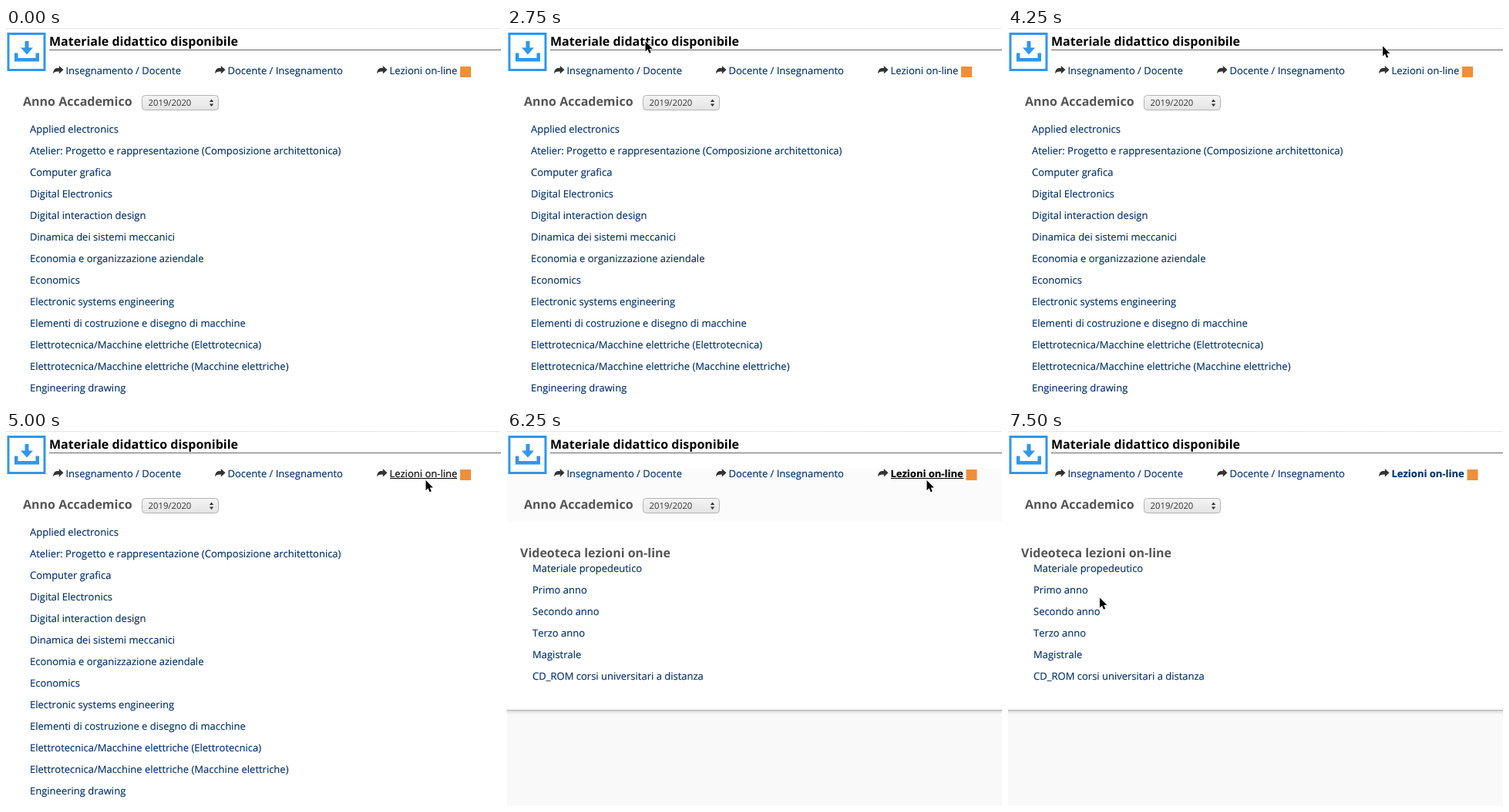
These frames come from a looping animation (642x487 px, 8000 ms). An HTML page:

```html
<!DOCTYPE html>
<html lang="it">
<head>
<meta charset="utf-8">
<title>Materiale didattico</title>
<style>
  html, body { margin: 0; width: 100%; height: 100%; overflow: hidden; background: #fff; }
  svg { display: block; width: 642px; height: 487px; }
  text {
    font: 13px "Open Sans", "Noto Sans", sans-serif;
    font-kerning: none;
    text-rendering: geometricPrecision;
    fill: #00306c;
    stroke: #00306c;
    stroke-width: .15px;
  }
  .h { font-size: 16px; font-weight: 700; fill: #555; stroke: none; }
  .title { fill: #000; }
  .year { font-size: 11.3px; fill: #333; stroke: none; }
  .bold { font-weight: 700; }
  .hover { fill: #000; stroke: #000; }
</style>
</head>
<body>
<svg viewBox="0 0 642 487">
  <defs>
    <linearGradient id="shade" x2="0" y2="1">
      <stop stop-color="#a6a6a6"/>
      <stop offset=".3" stop-color="#dedede"/>
      <stop offset="1" stop-color="#f9f9f9"/>
    </linearGradient>
    <linearGradient id="button" x2="0" y2="1">
      <stop stop-color="#f4f4f4"/>
      <stop offset="1" stop-color="#e4e4e4"/>
    </linearGradient>
    <path id="go" d="M13.500 5.300 7.800 0V3H6C2 3 .4 5.600 0 10.500 1.200 8.300 3 7.600 6 7.600H7.800V10.600Z" fill="#333"/>
  </defs>

  <rect width="642" height="487" fill="#fff"/>
  <rect id="tint" y="49" width="642" fill="#fbfbfb"/>
  <g id="foot">
    <rect width="642" height="487" fill="#f9f9f9"/>
    <rect width="642" height="6" fill="url(#shade)"/>
  </g>

  <path d="M0 .5H642" stroke="#ccc" stroke-dasharray="1 1"/>
  <rect id="mark" x="138" y="6" width="72" height="22" fill="#b3d7ff"/>
  <path d="M56 28.5H642" stroke="#666"/>
  <rect x="3" y="7.5" width="47" height="47" fill="none" stroke="#2f97ec" stroke-width="3"/>
  <path d="M11 32.500H15.500V39H38.500V32.500H43V43.500H11ZM24.500 17H29.500V25.500H35L27 34.500 19 25.500H24.500Z" fill="#2f97ec"/>

  <text class="h title" x="56" y="23">Materiale didattico disponibile</text>
  <use href="#go" x="61" y="49"/>
  <text x="77.500" y="60">Insegnamento / Docente</text>
  <use href="#go" x="271" y="49"/>
  <text x="287.500" y="60">Docente / Insegnamento</text>
  <use href="#go" x="481" y="49"/>
  <text id="link" x="497.500" y="60">Lezioni on-line</text>
  <path id="line" stroke="#000"/>
  <rect id="badge" y="50" width="14" height="14" fill="#ee8f3c"/>

  <text class="h" x="22" y="101">Anno Accademico</text>
  <rect x="176.500" y="87.500" width="99" height="19" rx="4" fill="url(#button)" stroke="#b4b4b4"/>
  <text class="year" x="184.500" y="101">2019/2020</text>
  <path d="M263.800 96 266.500 92.500 269.200 96ZM263.800 98.500H269.200L266.500 102Z" fill="#333"/>

  <g id="courses"></g>
  <g id="dots" fill="#fb6a1e">
    <circle cx="6.500" cy="122" r="3"/>
    <circle cx="16.500" cy="122" r="3"/>
    <circle cx="26.500" cy="122" r="3" opacity=".4"/>
  </g>
  <g id="videos">
    <text class="h" x="17" y="164">Videoteca lezioni on-line</text>
  </g>

  <path id="cursor" d="M0 0V13L3 10.300 5 15.200 7.200 14.300 5.200 9.400H9.300Z"
        fill="#000" stroke="#fff" stroke-width="1.600" paint-order="stroke"/>
</svg>
<script>
const $ = id => document.getElementById(id);
const LOOP = 8000;

const courses = [
  'Applied electronics',
  'Atelier: Progetto e rappresentazione (Composizione architettonica)',
  'Computer grafica',
  'Digital Electronics',
  'Digital interaction design',
  'Dinamica dei sistemi meccanici',
  'Economia e organizzazione aziendale',
  'Economics',
  'Electronic systems engineering',
  'Elementi di costruzione e disegno di macchine',
  'Elettrotecnica/Macchine elettriche (Elettrotecnica)',
  'Elettrotecnica/Macchine elettriche (Macchine elettriche)',
  'Engineering drawing'
];
const videos = [
  'Materiale propedeutico', 'Primo anno', 'Secondo anno', 'Terzo anno',
  'Magistrale', 'CD_ROM corsi universitari a distanza'
];

function addList(group, items, x, y) {
  items.forEach((item, i) => {
    const el = document.createElementNS('http://www.w3.org/2000/svg', 'text');
    el.setAttribute('x', x);
    el.setAttribute('y', y + i * 28);
    el.textContent = item;
    group.append(el);
  });
}
addList($('courses'), courses, 31, 136);
addList($('videos'), videos, 33, 183);

// Pointer tip: [start ms, x, y]
const moves = [
  [750, 388.5, 223.5], [1250, 378.5, 224.5], [1500, 510.5, 24.5], [2250, 449, 1],
  [2500, 214, 10.5], [2750, 179.5, 17.5], [4000, 486, 23.5], [4500, 595.5, 86.5],
  [4750, 548.5, 65], [5000, 544.5, 64], [7000, 531, 62.5], [7250, 177, 112.5],
  [7500, 119, 216.5]
];

const show = (id, on) => $(id).setAttribute('visibility', on ? 'visible' : 'hidden');
const set = (id, name, value) => $(id).setAttribute(name, value);

function draw(t) {
  const within = (from, to = LOOP) => t >= from && t < to;
  const opened = within(6000);
  const loading = within(6000, 6250);
  const hover = within(4750, 7250);

  const tip = moves.findLast(m => m[0] <= t);
  show('cursor', tip);
  if (tip) set('cursor', 'transform', `translate(${tip[1]} ${tip[2]})`);

  show('mark', within(3750, 4250));
  show('courses', !opened);
  show('dots', loading);
  show('videos', within(6250));
  show('foot', opened);
  set('foot', 'transform', `translate(0 ${loading ? 132 : 362})`);
  show('tint', within(6000, 7500));
  set('tint', 'height', loading ? 83 : 69);

  set('link', 'class', (opened ? 'bold ' : '') + (hover ? 'hover' : ''));
  show('line', hover);
  set('line', 'd', `M498 61.5H${opened ? 592 : 585}`);
  set('badge', 'x', opened ? 595.5 : 589);
}

function tick() {
  draw(performance.now() % LOOP);
  requestAnimationFrame(tick);
}
tick();
</script>
</body>
</html>
```
